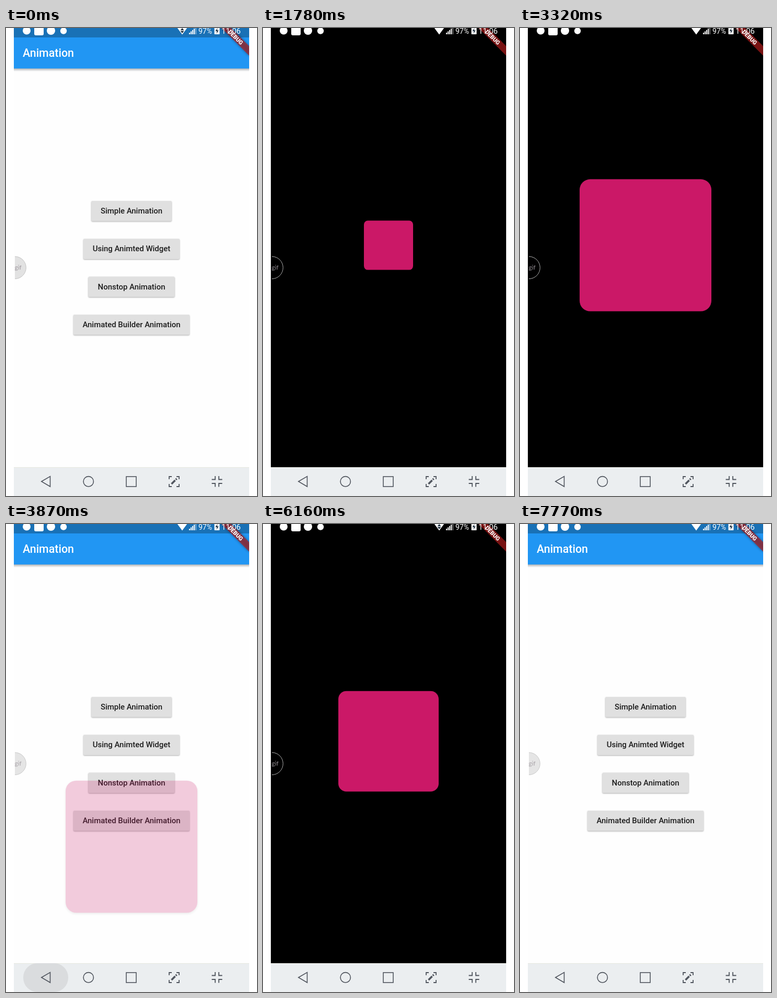
Animation, 480 px wide and 893 px high, one loop 8000 ms. Source, as an HTML page:

```html
<!DOCTYPE html>
<html lang="en">
<head>
<meta charset="utf-8">
<title>Animation</title>
<style>
  html, body { margin: 0; height: 100%; overflow: hidden; background: #fff; }
  #stage { display: block; width: 100vw; height: 100vh; }
  text { font-family: Roboto, "Noto Sans", sans-serif; }
  .title { font-size: 21.4px; font-weight: 500; fill: #fff; }
  .label { font-size: 14.95px; font-weight: 500; fill: #1c1c1c; text-anchor: middle; }
  .face { fill: #e0e0e0; filter: drop-shadow(0 1.2px 1px rgba(0, 0, 0, .32)); }
  .ink { fill: #bcbcbc; }
  .status { fill: #fff; }
  .nav { fill: none; stroke: #50555e; stroke-width: 1.6; }
  .debug { font-size: 10.9px; font-weight: 900; fill: #fff; text-anchor: middle; }
  .gif { font: 12px Lato, sans-serif; fill: #a09aa0; }
  #tile { fill: #cb1867; filter: drop-shadow(0 2px 2.5px rgba(0, 0, 0, .35)); }
</style>
</head>
<body>
<svg id="stage" viewBox="0 0 480 893">
  <defs>
    <clipPath id="screen"><rect x="15" width="450" height="838"/></clipPath>
    <linearGradient id="edge" x2="0" y2="1">
      <stop stop-color="#000" stop-opacity=".3"/>
      <stop offset="1" stop-color="#000" stop-opacity="0"/>
    </linearGradient>
    <filter id="soft" x="-20%" y="-80%" width="140%" height="260%">
      <feGaussianBlur stdDeviation="2.4"/>
    </filter>
  </defs>
  <rect width="480" height="893" fill="#fff"/>

  <g clip-path="url(#screen)">
    <rect x="15" width="450" height="838" fill="#000"/>
    <g id="home">
      <rect x="15" width="450" height="838" fill="#fefefe"/>
      <rect x="15" y="77" width="450" height="6" fill="url(#edge)"/>
      <rect x="15" width="450" height="77.3" fill="#2196f3"/>
      <rect x="15" width="450" height="18" fill="#1971b6"/>
      <text class="title" x="32" y="55.2">Animation</text>
      <g id="buttons"></g>
    </g>
    <rect id="tile"/>

    <g transform="translate(465 -8) rotate(45)">
      <rect x="-43" y="30" width="86" height="13" fill="#000" opacity=".4" filter="url(#soft)"/>
      <rect x="-43" y="30" width="86" height="13" fill="#b71c1c" opacity=".66"/>
      <text class="debug" y="40.4">DEBUG</text>
    </g>
    <g class="status">
      <circle cx="39.5" cy="5" r="7.5"/>
      <rect x="54" y="-4" width="18" height="18" rx="3"/>
      <circle cx="86" cy="5" r="8"/>
      <circle cx="110" cy="5.5" r="6.2"/>
      <path d="M327 -1Q337 -7 347 -1L337 12.5Z"/>
      <path id="traffic" fill="#122536" d="M333.5 4.2l3.5 -4 3.5 4zM333.5 5.8h7l-3.5 4z"/>
      <g id="bars"></g>
      <text x="368" y="10.5" font-size="14">97%</text>
      <rect x="398.5" y="-2" width="10" height="14" rx="1"/>
      <path d="M404.5 0l-4 6h3l-1 5 4-6.500h-3z" fill="#123"/>
      <text x="412" y="10.5" font-size="14.8">11:06</text>
    </g>
  </g>

  <g id="bubble">
    <path d="M17 436a21.3 21.3 0 0 1 0 42.600" fill="#000" fill-opacity=".11" stroke="#c2c2c2" stroke-width="1"/>
    <text class="gif" x="16.5" y="460.500">gif</text>
  </g>

  <rect x="15" y="838" width="450" height="55" fill="#ebeef0"/>
  <path d="M15 838.500H465" stroke="#e6e8e0"/>
  <rect id="press" x="33" y="838" width="86" height="55" rx="27" fill="#dadcde"/>
  <g class="nav">
    <path d="M67.800 865.300L84.500 855.600V875Z"/>
    <circle cx="157.700" cy="865.300" r="9.700"/>
    <rect x="230" y="856" width="19" height="19"/>
    <path d="M312 861V856H317M326 856H331V861M331 870V875H326M317 875H312V870" stroke-width="1.800"/>
    <path d="M316.500 870L323.500 863M324.700 861.800L326.500 860" stroke-width="3.600"/>
    <path d="M393.500 861.500H400V855M407 855V861.500H413.500M413.500 869H407V875.500M400 875.500V869H393.500" stroke-width="1.800"/>
  </g>
</svg>

<script>
const LOOP = 8000, CENTER = { x: 240, y: 414.6 }, FULL = 252, GROW = 1916, SLIDE = 300, RISE = 211;

// Screen refreshes as [first, last, count]
const stamps = [
  [0, 0, 1], [390, 390, 1], [870, 1590, 10], [1690, 1780, 2], [1870, 2450, 7],
  [2540, 2930, 5], [3320, 3320, 1], [3490, 4060, 8], [4480, 4900, 6], [5020, 5200, 3],
  [5300, 6060, 9], [6160, 6630, 6], [7150, 7300, 3], [7400, 7590, 4], [7770, 7770, 1]
].flatMap(([a, b, n]) =>
  Array.from({ length: n }, (_, i) => Math.round(a + (b - a) * i / Math.max(1, n - 1))));

const visits = [
  { button: 0, tap: 870, push: 1065, back: 3490, pop: 3555 },
  { button: 1, tap: 4480, push: 4701, back: 7150, pop: 7215 }
];

const $ = id => document.getElementById(id);
const clamp = v => Math.min(1, Math.max(0, v));
const ramp = (t, from, length) => clamp((t - from) / length);

function add(parent, tag, attrs, text) {
  const el = document.createElementNS('http://www.w3.org/2000/svg', tag);
  set(el, attrs);
  if (text) el.textContent = text;
  return parent.appendChild(el);
}

function set(el, attrs) {
  for (const key in attrs) el.setAttribute(key, attrs[key]);
}

// Cubic bezier (0.4, 0, 0.2, 1)
function ease(x) {
  let lo = 0, hi = 1;
  for (let i = 0; i < 24; i++) {
    const s = (lo + hi) / 2, r = 1 - s;
    if (1.2 * r * r * s + 0.6 * r * s * s + s * s * s < x) lo = s; else hi = s;
  }
  return lo * lo * (3 - 2 * lo);
}

const inks = [
  ['Simple Animation', 153.5], ['Using Animted Widget', 184],
  ['Nonstop Animation', 165], ['Animated Builder Animation', 222]
].map(([label, width], i) => {
  const x = CENTER.x - width / 2, y = 330 + i * 72.3, height = 38.6;
  const g = $('buttons');
  add(g, 'rect', { class: 'face', x, y, width, height, rx: 2 });
  const clip = add(g, 'svg', { x, y, width, height });
  const ink = {
    glow: add(clip, 'rect', { class: 'ink', width, height, rx: 2 }),
    splash: add(clip, 'circle', { class: 'ink', cx: width / 2, cy: height / 2 }),
    reach: width / 2
  };
  add(g, 'text', { class: 'label', x: CENTER.x, y: y + 24.1 }, label);
  return ink;
});

for (let i = 0; i < 5; i++) {
  const height = 3 + i * 2.6;
  add($('bars'), 'rect', { x: 350 + i * 3, y: 12 - height, width: 2, height, opacity: i < 4 ? 1 : 0.45 });
}

function draw(time) {
  const t = stamps.findLast(s => s <= time);
  const visit = visits[t < 4300 ? 0 : 1];

  const shown = t < visit.pop ? ramp(t, visit.push, SLIDE) : 1 - ramp(t, visit.pop, SLIDE);
  const size = FULL * ramp(t, visit.push, GROW);
  const drop = RISE * (1 - ease(shown));
  $('home').style.display = shown < 1 ? '' : 'none';
  set($('tile'), {
    x: CENTER.x - size / 2, y: CENTER.y - size / 2 + drop,
    width: size, height: size, rx: size * 0.08,
    opacity: clamp(shown / 0.6)
  });

  inks.forEach(({ glow, splash, reach }, i) => {
    const grow = i === visit.button ? ramp(t, visit.tap, 220) : 0;
    const fade = 1 - ramp(t, visit.push, 200);
    set(glow, { opacity: 0.4 * grow * fade });
    set(splash, { r: reach * (0.25 + 0.75 * grow), opacity: grow ? 0.4 * fade : 0 });
  });

  const held = t - visit.back;
  set($('press'), { opacity: ramp(held, -60, 120) * (1 - ramp(held, 350, 220)) });
  set($('traffic'), { opacity: t < 1300 || (t > 5850 && t < 6500) ? 1 : 0 });
  set($('bubble'), { opacity: t < 390 ? 1 : 0.9 });
}

function tick() {
  draw(performance.now() % LOOP);
  requestAnimationFrame(tick);
}
tick();
</script>
</body>
</html>
```
